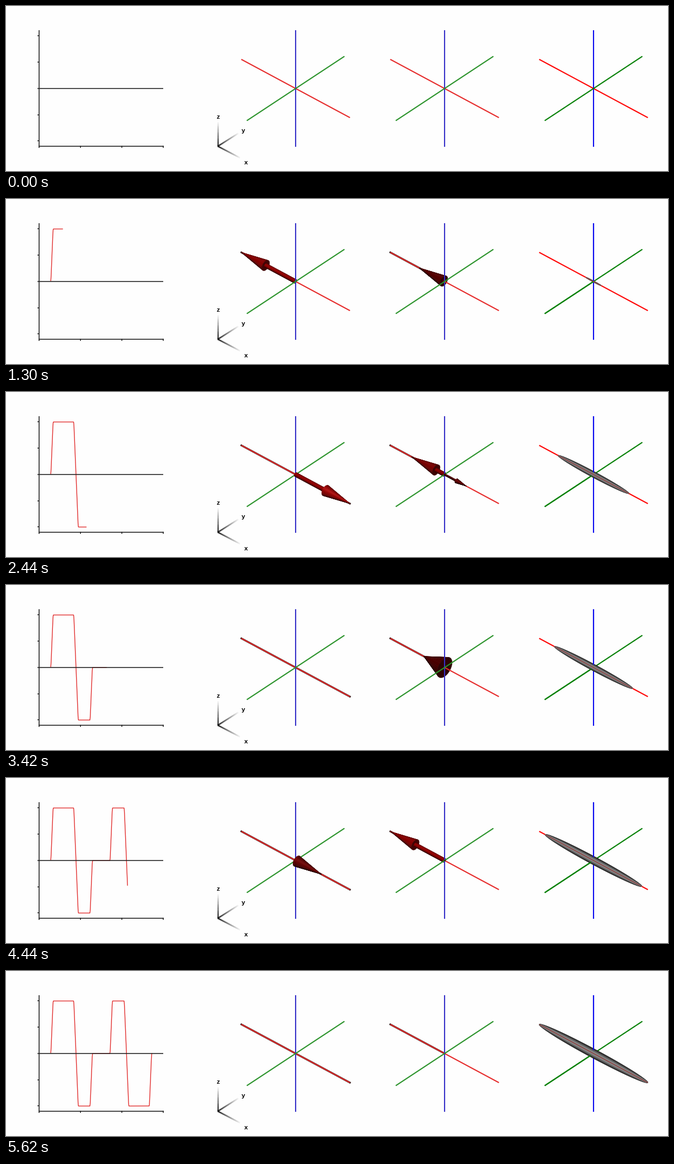
These frames come from a looping animation (1200x300 px, 7.16 s). A matplotlib script:

```python
import numpy as np
import matplotlib.pyplot as plt
from matplotlib.animation import FuncAnimation
from matplotlib.collections import LineCollection, PolyCollection

W, H, DPI = 1200, 300, 100
STEP, FRAMES, LEAD, LAST = 20, 358, 37, 244
PX = 72 / DPI

# Isometric-like view: screen vectors of the unit axes and the view direction
X, Y, Z = np.array([98.5, 53]), np.array([88.5, -58.5]), np.array([0, -106])
SCALE = 132.3
VIEW = np.array([0.534, -0.597, 0.598])
LIGHT = VIEW + [0, 0, 0.3]
LIGHT = LIGHT / np.linalg.norm(LIGHT)
HEAD, HEAD_R, SHAFT_R = 0.45, 10.5, 3.7

# ---- waveform, its integral and the accumulated weighting
SUB = 4
grid = np.arange(-SUB, LAST * SUB + 1) / SUB
KEY_T = [-0.2, 5.1, 55.2, 65.8, 94.7, 100, 143, 148.3, 177.2, 187.8, 237.9, 243.2]
KEY_G = [0, 1, 1, -1, -1, 0, 0, 1, 1, -1, -1, 0]
offsets = np.linspace(-0.7, 0.7, 9)
wave = np.mean([np.interp(grid + o, KEY_T, KEY_G) for o in offsets], axis=0)
area = np.cumsum(wave) / SUB
peak = area.max()
q = area / peak
size = np.sqrt(np.cumsum(q ** 2) / np.sum(q ** 2))

lobe = np.zeros_like(wave)
for j in range(1, len(wave)):
    if abs(wave[j]) > 0.01:
        same = wave[j] * wave[j - 1] > 0
        lobe[j] = (lobe[j - 1] if same else 0) + wave[j] / SUB / peak

fig = plt.figure(figsize=(W / DPI, H / DPI), dpi=DPI, facecolor="#fefefe")
ax = fig.add_axes([0, 0, 1, 1])
ax.set_xlim(0, W)
ax.set_ylim(H, 0)
ax.axis("off")


def line(a, b, color, width, z=1):
    return ax.plot([a[0], b[0]], [a[1], b[1]], color=color, lw=width * PX,
                   solid_capstyle="butt", zorder=z)[0]


# ---- graph
INK = "#222222"
line((60, 44), (60, 258), INK, 1.6, 3)
line((59.3, 254.7), (285.5, 254.7), INK, 1.6, 3)
line((60, 150), (285, 150), INK, 1.6, 3)
for j in range(5):
    line((57, 54.4 + 47.75 * j), (60, 54.4 + 47.75 * j), INK, 1.5, 3)
for j in range(1, 4):
    line((60 + 75 * j, 254), (60 + 75 * j, 258), INK, 1.5, 3)
curve, = ax.plot([], [], color="#e23030", lw=1.4 * PX, zorder=2,
                 solid_joinstyle="round")

# ---- compass
HUB = np.array([384, 255])
for tip, name, spot in (((384, 211), "z", (384, 201)),
                        ((421, 231.5), "y", (430, 226)),
                        ((424, 276), "x", (435, 284))):
    f = np.linspace(0, 1, 25)[:, None]
    pts = HUB + f * (np.array(tip) - HUB)
    shades = [(s, s, s) for s in 0.08 + 0.9 * f[:-1, 0]]
    ax.add_collection(LineCollection(list(zip(pts[:-1], pts[1:])), colors=shades,
                                     linewidths=2.6 * PX, zorder=2))
    ax.text(*spot, name, family="Liberation Sans", weight="bold",
            size=11.5 * PX, color="black", ha="center", va="center_baseline")


def shade(normal, gain):
    d = max(0, normal @ LIGHT / np.linalg.norm(normal))
    spec = 0.22 * d ** 18
    return (gain * (0.2 + 0.4 * d + spec), gain * spec * 0.8, gain * spec * 0.8)


def ring(c, x, r, a):
    """Screen point at x along the axis, at radius r and angle a around it."""
    return c + X * x + r * (np.cos(a) * Y + np.sin(a) * Z) / SCALE


def arrow(c, p, scaled=False):
    """Shaded facets of an arrow from the centre to p on the x axis."""
    n, sg = abs(p), np.sign(p)
    if n < 0.01:
        return [], []
    head, r, shaft, gain = HEAD, HEAD_R, SHAFT_R, np.interp(n, [0.45, 0.65], [0.62, 1])
    if scaled:
        head, r, shaft = head * n, r * n, shaft * n
    elif n < HEAD:
        head, r, shaft = n, 23.5 - 8 * n, 0
    base = p - sg * head
    edges = np.linspace(0, 2 * np.pi, 33)
    cone, rod = [], []
    for a, b in zip(edges[:-1], edges[1:]):
        m = (a + b) / 2
        e = np.array([0, np.cos(m), np.sin(m)])
        slope = e * head * SCALE + np.array([sg * r, 0, 0])
        if slope @ VIEW > 0:
            cone.append(([ring(c, base, r, a), ring(c, base, r, b), c + X * p],
                         shade(slope, gain)))
        if shaft and e @ VIEW > 0:
            rod.append(([ring(c, 0, shaft, a), ring(c, 0, shaft, b),
                         ring(c, base, shaft, b), ring(c, base, shaft, a)],
                        shade(e, gain)))
    if sg < 0:
        cone.append(([ring(c, base, r, a) for a in edges], (0.22 * gain + 0.04, 0.01, 0.01)))
        if shaft:
            rod.append(([ring(c, 0, shaft, a) for a in edges], (0.25, 0.08, 0.08)))
    parts = cone + rod if sg < 0 else rod + cone
    return [v for v, _ in parts], [col for _, col in parts]


def facets():
    return ax.add_collection(PolyCollection([], linewidths=0.4, zorder=2))


def show(coll, verts, colors, z):
    coll.set_verts(verts)
    coll.set_facecolor(colors)
    coll.set_edgecolor(colors)
    coll.set_zorder(z)


class Panel:
    def __init__(self, cx, colors):
        red, green, blue = colors
        self.c = c = np.array([cx, 150.0])
        self.trail = line(c, c, "#1c0808", 3.1, 0.5)
        line(c - X, c, red, 2.1, 1)
        line(c, c + X, red, 2.1, 3)
        line(c - Z, c + Z, blue, 2.1, 3)
        line(c - Y, c + Y, green, 2.1, 3)
        self.main, self.extra = facets(), facets()

    def draw(self, p, low, high, extra=0):
        a, b = self.c + X * low * 1.012, self.c + X * high * 1.012
        self.trail.set_data([a[0], b[0]], [a[1], b[1]])
        show(self.main, *arrow(self.c, p), 4 if p > 0 else 2)
        show(self.extra, *arrow(self.c, extra, True), 4.1 if extra > 0 else 1.9)


SOFT = ("#e62b2b", "#2b932b", "#3630c8")
left, mid = Panel(525, SOFT), Panel(795, SOFT)

# ---- spindle on the right
C = np.array([1065.0, 150.0])
RED, GREEN, BLUE = "#ff0000", "#008000", "#0a0af0"
line(C - X, C + X, RED, 2.1)
line(C - Z, C + Z, BLUE, 2.1)
line(C - Y, C + Y, GREEN, 2.1)
spindle = facets()
core = line(C, C, "#8a2626", 1.1, 3)
front = [(line(C, C, BLUE, 2.1, 4), Z), (line(C, C, GREEN, 2.1, 4), -Y)]
SIDE = np.array([-X[1], X[0]]) / np.hypot(*X)
turn = np.linspace(0, 2 * np.pi, 72)[:, None]
widths = np.linspace(1, 0.06, 12)


def draw_spindle(s):
    visible = s > 0.01
    r = 8 * s
    verts = [C + np.cos(turn) * X * s + np.sin(turn) * SIDE * r * w for w in widths]
    grays = [(g, g, g) for g in 0.1 + 0.46 * (1 - widths ** 2) ** 1.3]
    show(spindle, verts if visible else [], grays if visible else [], 2)
    a, b = C - X * s, C + X * s
    core.set_data([a[0], b[0]], [a[1], b[1]])
    core.set_visible(visible)
    for art, v in front:
        a, b = C + v * r / SCALE, C + v
        art.set_data([a[0], b[0]], [a[1], b[1]])
        art.set_visible(visible)


def update(i):
    k = min(i - LEAD, LAST)
    if k < 0:
        curve.set_data([], [])
        left.draw(0, 0, 0)
        mid.draw(0, 0, 0)
        draw_spindle(0)
        return []
    j = (k + 1) * SUB
    past = wave[:j + 1]
    curve.set_data(81.5 + 0.75 * grid[SUB - 2:j + 1], 150 - 95.5 * past[SUB - 2:])
    left.draw(-wave[j], -past.max(), -past.min())
    mid.draw(-q[j], -1 if k > 0 else 0, 0, -lobe[j])
    draw_spindle(size[j])
    return []


anim = FuncAnimation(fig, update, frames=FRAMES, interval=STEP,
                     init_func=lambda: update(0), repeat=True, repeat_delay=0)
plt.show()
```
